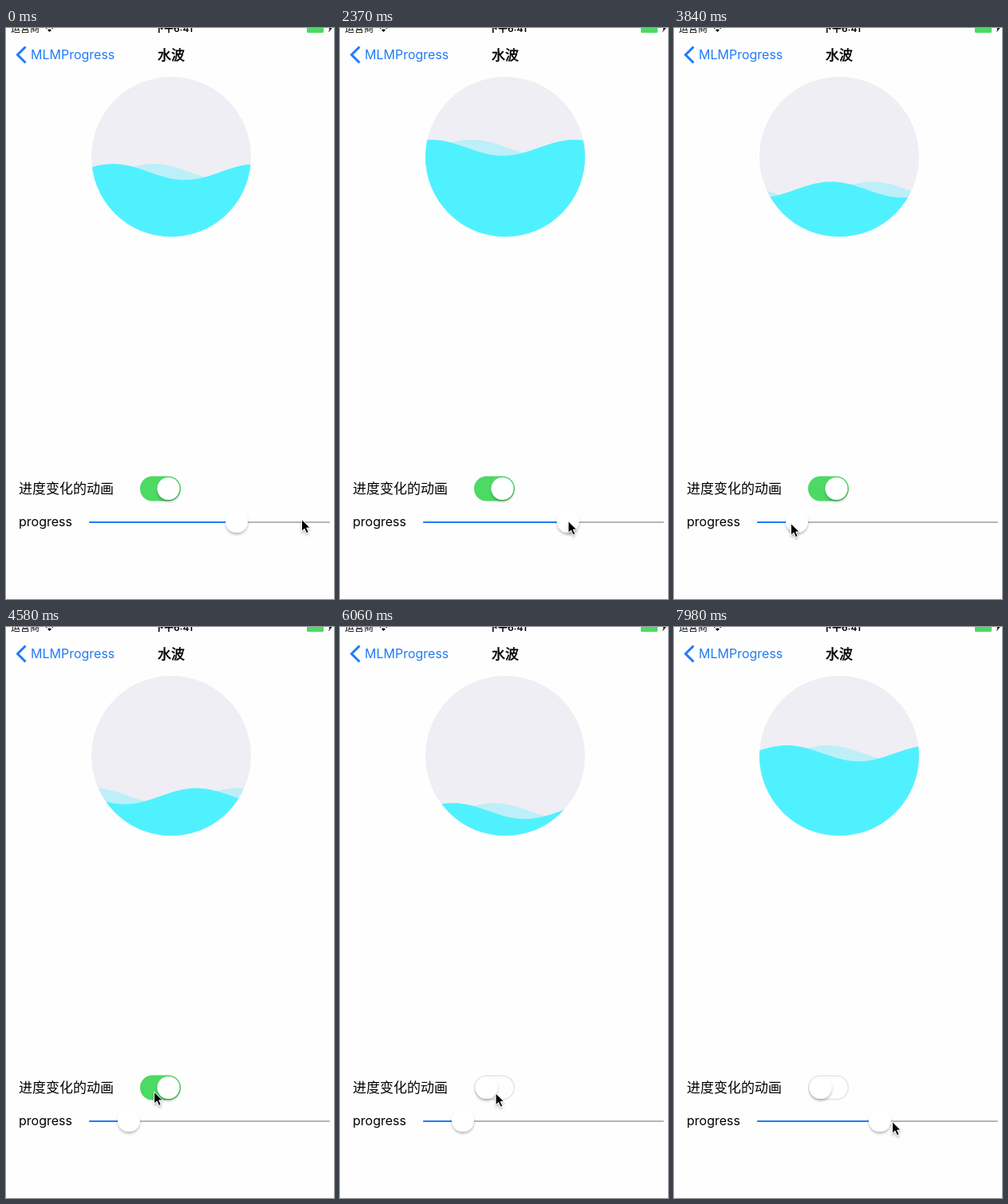
Write an HTML page that moves like this. It is 411 px wide and 714 px high and loops after 8 s.

```html
<!DOCTYPE html>
<html lang="zh">
<head>
<meta charset="utf-8">
<style>
  html, body { margin: 0; width: 100%; height: 100%; overflow: hidden; background: #fefefe; }
  svg { display: block; width: 100%; height: 100%; }
  text { font-family: Inter, "Noto Sans CJK SC", "Noto Sans CJK", sans-serif; }
</style>
</head>
<body>
<svg viewBox="0 0 411 714">
  <defs>
    <clipPath id="disc"><circle cx="207" cy="161" r="100"/></clipPath>
    <filter id="shadow" x="-50%" y="-50%" width="200%" height="200%">
      <feDropShadow dx="0" dy="2.5" stdDeviation="1.8" flood-opacity=".25"/>
    </filter>
  </defs>

  <!-- status bar, cut off by the top edge -->
  <text x="6" y="5" font-size="12">运营商</text>
  <path d="M50 0.500Q54.500 -3 59 0.500" fill="none" stroke="#000" stroke-width="1.500"/>
  <path d="M52 2.500Q54.500 0.500 57 2.500L54.500 5Z"/>
  <text x="210" y="5" font-size="12" font-weight="600" text-anchor="middle">下午6:41</text>
  <rect x="377" y="-5" width="21" height="11" rx="1.500" fill="#4cd964"/>
  <path d="M407.500 -1H403L405.500 1L404 5.500L408.500 0Z"/>

  <!-- navigation bar -->
  <path d="M24.500 23.500L14.500 33.500L24.500 43.500" fill="none" stroke="#1f7cf8" stroke-width="3"/>
  <text x="31" y="39" font-size="16" fill="#1f7cf8">MLMProgress</text>
  <text x="207" y="39.500" font-size="17" text-anchor="middle" stroke="#000" stroke-width=".5">水波</text>

  <!-- water -->
  <circle cx="207" cy="161" r="100" fill="#efeef4"/>
  <g clip-path="url(#disc)">
    <path id="backWave" fill="#bdeff8"/>
    <path id="frontWave" fill="#50f1ff"/>
  </g>

  <!-- controls -->
  <text x="16" y="582" font-size="17">进度变化的动画</text>
  <rect x="168.800" y="561.300" width="49.500" height="29.500" rx="14.750" fill="#fefefe" stroke="#e5e5e5" stroke-width="1.500"/>
  <rect id="switchOn" x="168" y="560.500" width="51" height="31" rx="15.500" fill="#4cd964"/>
  <circle id="knob" cy="576" r="14" fill="#fff" filter="url(#shadow)"/>

  <text x="16" y="623" font-size="16">progress</text>
  <rect x="104" y="617" width="302" height="2" rx="1" fill="#b6b6b6"/>
  <rect id="filled" x="104" y="617" height="2" rx="1" fill="#1f7cf8"/>
  <circle id="thumb" cy="617" r="14" fill="#fff" filter="url(#shadow)"/>

  <path id="cursor" d="M0 0V14.800L3.500 11.600L6 17.200L8.700 16L6.200 10.600H10.700Z" stroke="#fff" stroke-width="1" stroke-linejoin="round" filter="url(#shadow)"/>
</svg>
<script>
const LOOP = 8000;
const STEPS = 54;
const STEP_MS = 7980 / STEPS;
const AMPLITUDE = 10;
const WAVELENGTH = 180;
const BACK_SHIFT = 51;

// Steps in which the slider is dragged, first down and then up again.
const DRAG_DOWN = [15.8, 24];
const DRAG_UP = [49, 54];

// Pointer moves: step range, then the distance covered.
const HOME = { x: 370, y: 614 };
const MOVES = [
  { steps: [2.5, 12], dx: -81, dy: 12 },
  { steps: [12, 15.5], dx: 0, dy: -10 },
  { steps: DRAG_DOWN, dx: -143, dy: 3 },
  { steps: [27, 31.5], dx: 44, dy: -43 },
  { steps: [40, 47], dx: 32, dy: 45 },
  { steps: [47, 49], dx: -59, dy: 5 },
  { steps: DRAG_UP, dx: 110, dy: -8 },
];

const el = id => document.getElementById(id);

// Goes from 0 to 1 over a range of steps.
const ramp = (step, [from, to]) => Math.min(1, Math.max(0, (step - from) / (to - from)));

function wavePath(peakX, peakY) {
  let d = "M107 261";
  for (let x = 107; x <= 307; x += 2) {
    const angle = (x - peakX) * 2 * Math.PI / WAVELENGTH;
    d += `L${x} ${(peakY + AMPLITUDE * (1 - Math.cos(angle))).toFixed(2)}`;
  }
  return d + "V261Z";
}

function draw(time) {
  // The picture advances in even steps; the small lead absorbs timer rounding.
  const step = Math.min(STEPS, Math.floor(time / STEP_MS + 0.1));
  const down = ramp(step, DRAG_DOWN);
  const up = ramp(step, DRAG_UP);

  // The wave runs left, a little faster once the slider has been touched.
  const peakX = 134 - 23.75 * Math.min(step, 16) - 27.7 * Math.max(0, step - 16);
  const peakY = 170 - 31.5 * ramp(step, [0, 13.5]) + 50 * down
    + 46.5 * ramp(step, [24, 49]) - 87 * up;
  el("frontWave").setAttribute("d", wavePath(peakX, peakY));
  el("backWave").setAttribute("d", wavePath(peakX + BACK_SHIFT, peakY));

  const thumb = 289 - 135 * down + 104 * up;
  el("thumb").setAttribute("cx", thumb);
  el("filled").setAttribute("width", thumb - 104);

  const on = 1 - ramp(step, [37, 39]);
  el("switchOn").setAttribute("opacity", on);
  el("knob").setAttribute("cx", 183.5 + 20 * on);

  let { x, y } = HOME;
  for (const move of MOVES) {
    const part = ramp(step, move.steps);
    x += move.dx * part;
    y += move.dy * part;
  }
  el("cursor").setAttribute("transform", `translate(${x + 0.5} ${y + 0.5})`);
}

const start = performance.now();
function tick() {
  draw((performance.now() - start) % LOOP);
  requestAnimationFrame(tick);
}
tick();
</script>
</body>
</html>
```
